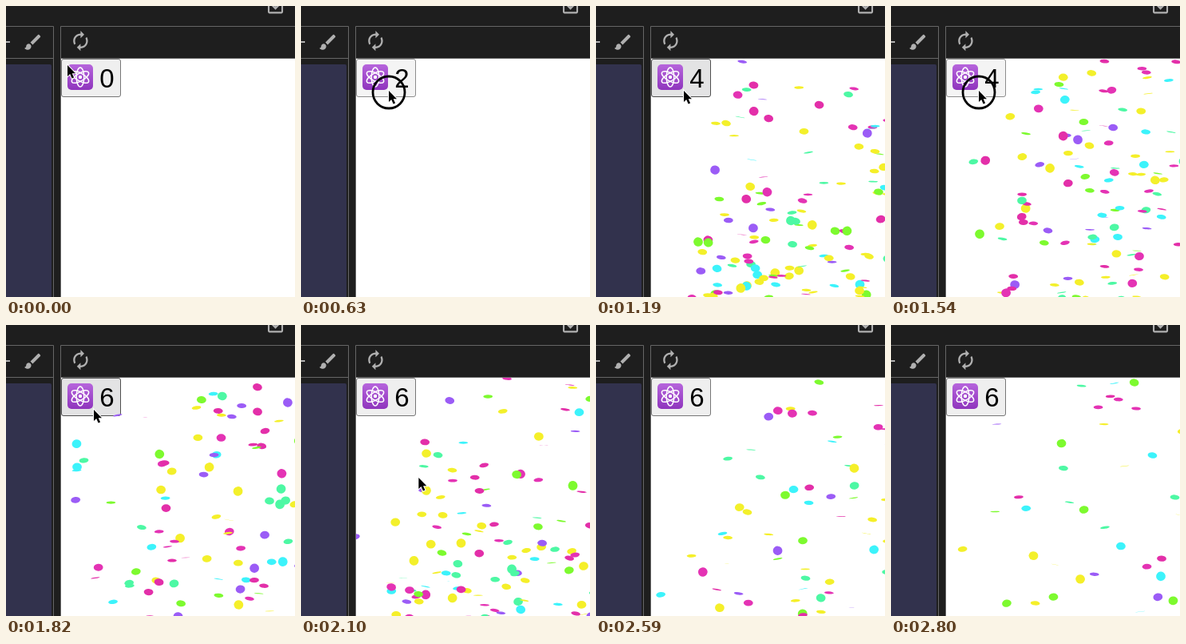
Write an HTML page with a canvas that moves like this. It is 362 px wide and 364 px high and loops after 2870 ms.

```html
<!DOCTYPE html>
<html lang="en">
<head>
<meta charset="utf-8">
<title>Confetti counter</title>
<style>
  html, body { margin: 0; width: 100%; height: 100%; overflow: hidden; background: #1e1e1e; }
  svg, canvas { position: absolute; left: 0; top: 0; }
  text { font: 33px "Liberation Sans", Arial, sans-serif; }
</style>
</head>
<body>
<svg width="362" height="364">
  <defs>
    <linearGradient id="violet" x2="0" y2="1">
      <stop stop-color="#b665dc"/><stop offset="1" stop-color="#8f35bd"/>
    </linearGradient>
  </defs>
  <rect width="362" height="364" fill="#1e1e1e"/>
  <path d="M0 73H55q2 0 2 2V364H0z" fill="#32324d"/>
  <path d="M69 66H362V364H69z" fill="#fff"/>
  <path d="M0 25.5H59.5V364M0 65.5H59M362 25.5H68.5V364M69 65.5H362" fill="none" stroke="#666"/>
  <g fill="#b0b0b0">
    <path d="M0 44h5v2H0z"/>
    <path transform="translate(21 32.5) scale(1.06)" d="M7 14c-1.66 0-3 1.34-3 3 0 1.31-1.16 2-2 2 .92 1.22 2.49 2 4 2 2.21 0 4-1.79 4-4 0-1.66-1.34-3-3-3zm13.71-9.37l-1.34-1.34c-.39-.39-1.02-.39-1.41 0L9 12.25 11.75 15l8.96-8.96c.39-.39.39-1.02 0-1.41z"/>
    <path transform="translate(79.6 29.9) scale(1.15)" d="M12 6v3l4-4-4-4v3c-4.42 0-8 3.58-8 8 0 1.57.46 3.03 1.24 4.26L6.7 14.8c-.45-.83-.7-1.79-.7-2.8 0-3.31 2.69-6 6-6zm6.76 1.74L17.3 9.2c.44.84.7 1.79.7 2.8 0 3.31-2.69 6-6 6v-3l-4 4 4 4v-3c4.42 0 8-3.58 8-8 0-1.57-.46-3.03-1.24-4.26z"/>
    <path transform="translate(324.8 -12.8) scale(1.06)" d="M19 12v7H5v-7H3v7c0 1.1.9 2 2 2h14c1.1 0 2-.9 2-2v-7zm-6 .67l2.59-2.58L17 11.5l-5 5-5-5 1.41-1.41L11 12.67V3h2z"/>
  </g>
  <rect id="button" x="69.5" y="66.5" width="74" height="47" rx="2.5" stroke="#767676"/>
  <rect x="77" y="73" width="32" height="32" rx="5" fill="url(#violet)"/>
  <g transform="translate(93 89)" fill="none" stroke="#fff" stroke-width="1.5">
    <ellipse rx="4.8" ry="12"/>
    <ellipse rx="4.8" ry="12" transform="rotate(60)"/>
    <ellipse rx="4.8" ry="12" transform="rotate(120)"/>
    <circle r="2.2" fill="#fff" stroke="none"/>
  </g>
  <text id="count" x="117.3" y="102">0</text>
</svg>
<canvas id="stage" width="362" height="364"></canvas>
<script>
const LOOP = 2870, STEP = 70;
const PRESSES = [280, 490, 630, 840, 1540, 1680];
const BURSTS = [490, 560, 700, 910, 1610, 1750];
const PER_BURST = 250, RADIUS = 5.9, GRAVITY = 0.00125;
const PANE = { x: 69, y: 66, w: 700, h: 760 };
const SPEED = Math.log(PANE.w) / Math.log(1920);
const COLORS = ['#f5ef29', '#7dfa2f', '#f3f02b', '#3cf3fb', '#4df8a4', '#9b5cf6', '#e32fa9', '#e433b4'];

const button = document.getElementById('button');
const count = document.getElementById('count');
const ctx = document.getElementById('stage').getContext('2d');
const arrow = new Path2D('M0 0V14L3.2 11 5.6 16.6 8.1 15.5 5.7 10.2H10z');

let seed = 20231;
function rand(a, b) {
  seed = (seed + 0x6D2B79F5) | 0;
  let n = Math.imul(seed ^ seed >>> 15, 1 | seed);
  n = n + Math.imul(n ^ n >>> 7, 61 | n) ^ n;
  return a + (b - a) * ((n ^ n >>> 14) >>> 0) / 4294967296;
}

// Half of each burst flies in from the left edge, half from the right.
function makeDot(start, i) {
  const dir = i % 2 ? -1 : 1;
  const angle = rand(15, 82) * Math.PI / 180;
  const cos = Math.cos(angle), sin = Math.sin(angle);
  const back = rand(0, 150);
  return {
    start, dir, cos, sin,
    x: (dir > 0 ? PANE.x : PANE.x + PANE.w) - dir * back * cos,
    y: PANE.y + PANE.h * 5 / 7 + back * sin,
    speed: rand(0.9, 1.7) * SPEED,
    cruise: rand(0.2, 0.6) * SPEED,
    drag: rand(0.0005, 0.0009),
    spin: rand(0.03, 0.07) * SPEED,
    tilt: dir * rand(0, 0.2),
    color: COLORS[Math.floor(rand(0, COLORS.length))]
  };
}

const dots = BURSTS.flatMap(start =>
  Array.from({ length: PER_BURST }, (_, i) => makeDot(start, i)));

function drawDot(d, time) {
  const t = time - d.start;
  if (t <= 0) return;
  const slow = Math.min(t, (d.speed - d.cruise) / d.drag);
  const run = d.speed * slow - d.drag * slow * slow / 2 + d.cruise * (t - slow);
  const x = d.x + d.dir * d.cos * run;
  const y = d.y - d.speed * d.sin * t + GRAVITY * t * t / 2;
  const turn = d.spin * t - 5e-6 * t * t;
  ctx.fillStyle = d.color;
  ctx.beginPath();
  ctx.ellipse(x, y, RADIUS, Math.abs(RADIUS - turn % (2 * RADIUS)), d.tilt, 0, 2 * Math.PI);
  ctx.fill();
}

function pointer(t) {
  if (t < 140) return [77 + 33 * t / 140, 74 + 32 * t / 140];
  const p = Math.max(0, (t - 1960) / 420);
  return [110 + 112 * p, 106 + 255 * p];
}

function draw(t) {
  const pressed = PRESSES.some(p => t >= p && t < p + STEP);
  const hover = t >= 490 && t < 2030;
  button.setAttribute('fill', !hover ? '#efefef' : pressed ? '#f4f4f4' : '#e3e3e4');
  button.setAttribute('stroke', !hover ? '#767676' : pressed ? '#8d8d8d' : '#4f4f4f');
  count.textContent = BURSTS.filter(b => t >= b).length;

  ctx.clearRect(0, 0, 362, 364);
  ctx.save();
  ctx.beginPath();
  ctx.rect(PANE.x, PANE.y, PANE.w, PANE.h);
  ctx.clip();
  dots.forEach(d => drawDot(d, t));
  ctx.restore();

  if (pressed) {
    ctx.strokeStyle = '#000';
    ctx.lineWidth = 2.8;
    ctx.beginPath();
    ctx.arc(110, 108, 20, 0, 2 * Math.PI);
    ctx.stroke();
  }
  ctx.save();
  ctx.translate(...pointer(t));
  ctx.strokeStyle = '#fff';
  ctx.lineWidth = 2;
  ctx.stroke(arrow);
  ctx.fillStyle = '#000';
  ctx.fill(arrow);
  ctx.restore();
}

const began = performance.now();
function tick() {
  const t = (performance.now() - began) % LOOP;
  draw(Math.floor(t / STEP) * STEP);
  requestAnimationFrame(tick);
}
tick();
</script>
</body>
</html>
```
